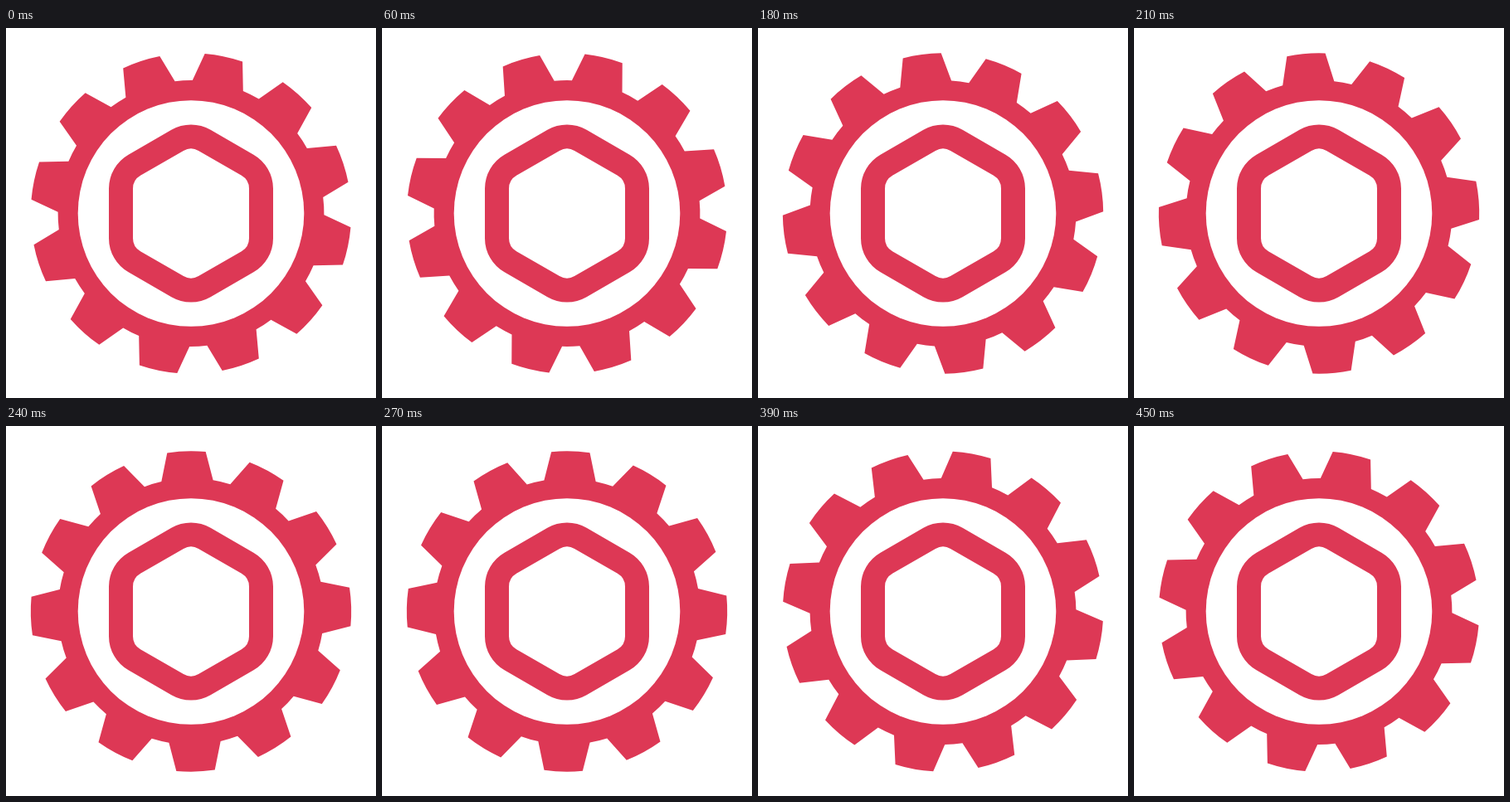
Write an HTML page that moves like this. It is 446 px wide and 446 px high and loops after 900 ms.

```html
<!DOCTYPE html>
<html lang="en">
<head>
<meta charset="utf-8">
<title>Turning gear</title>
<style>
  html, body { margin: 0; width: 100%; height: 100%; overflow: hidden; background: #fff; }
  svg { display: block; width: 100vw; height: 100vh; }
  .red { fill: #dd3855; }
  .white { fill: #fff; }
  .nut { stroke-linejoin: round; }
</style>
</head>
<body>
<svg viewBox="0 0 446 446">
  <g transform="translate(223 223.5)">
    <path id="gear" class="red"/>
    <circle class="white" r="136.3"/>
    <path class="nut red" stroke="#dd3855" stroke-width="94.4"/>
    <path class="nut white" stroke="#fff" stroke-width="36.4"/>
  </g>
</svg>
<script>
  const LOOP = 900, TURN = 450, TICK = 30;
  const TEETH = 12, PITCH = 360 / TEETH, START = 11.85;
  const TIP = 193.2, ROOT = 160.4, TIP_HALF = 6.9, ROOT_HALF = 11.2;

  const gear = document.getElementById('gear');

  // Point at a clockwise angle from the top.
  function polar(r, deg) {
    const a = deg * Math.PI / 180;
    return `${(r * Math.sin(a)).toFixed(2)} ${(-r * Math.cos(a)).toFixed(2)}`;
  }

  function gearPath() {
    let d = '';
    for (let i = 0; i < TEETH; i++) {
      const a = i * PITCH;
      d += i ? `A${ROOT} ${ROOT} 0 0 1 ` : 'M';
      d += polar(ROOT, a - ROOT_HALF);
      d += 'L' + polar(TIP, a - TIP_HALF);
      d += `A${TIP} ${TIP} 0 0 1 ` + polar(TIP, a + TIP_HALF);
      d += 'L' + polar(ROOT, a + ROOT_HALF);
    }
    return d + `A${ROOT} ${ROOT} 0 0 1 ${polar(ROOT, -ROOT_HALF)}Z`;
  }

  // The wide round-joined strokes give the nut its soft corners.
  function hexPath(apothem) {
    const r = apothem / Math.cos(Math.PI / 6);
    return 'M' + [0, 60, 120, 180, 240, 300].map(a => polar(r, a)).join('L') + 'Z';
  }

  function draw(ms) {
    const t = Math.floor((ms % LOOP) / TICK) * TICK;
    const p = Math.min(t / TURN, 1);
    const ease = p * p * (3 - 2 * p);
    gear.setAttribute('transform', `rotate(${START + PITCH * ease})`);
  }

  gear.setAttribute('d', gearPath());
  for (const nut of document.querySelectorAll('.nut')) nut.setAttribute('d', hexPath(51.8));

  let begin;
  function frame(now) {
    begin ??= now;
    draw(Math.max(0, now - begin));
    requestAnimationFrame(frame);
  }
  draw(0);
  requestAnimationFrame(frame);
</script>
</body>
</html>
```
